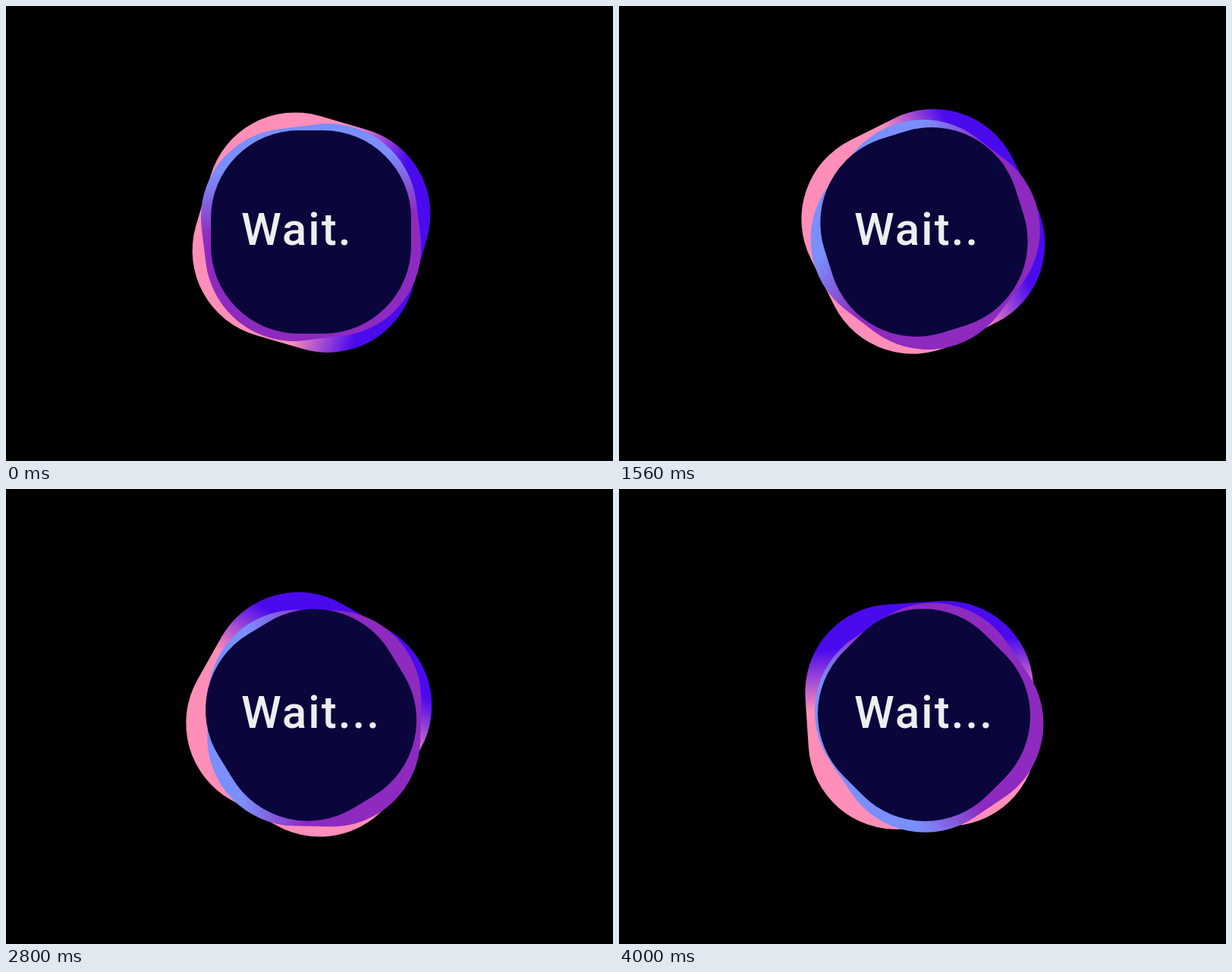
An HTML page with a canvas for the animation above (4040 ms loop, 800 by 600 pixels).

```html
<!DOCTYPE html>
<html lang="en">
<head>
<meta charset="utf-8">
<title>Wait</title>
<style>
  html, body { margin: 0; width: 100%; height: 100%; overflow: hidden; background: #000; }
  canvas { position: absolute; left: 0; top: 0; }
  #label {
    position: absolute; left: 310px; top: 260px;
    font: 500 60px/70px Roboto, sans-serif; letter-spacing: 2px;
    color: #eeeef0; white-space: pre;
  }
</style>
</head>
<body>
<canvas id="stage" width="800" height="600"></canvas>
<div id="label">Wait.</div>
<script>
const ctx = document.getElementById('stage').getContext('2d');
const label = document.getElementById('label');
const LOOP = 4040, STEP = 40;
const CENTER = { x: 402, y: 298 };

function gradient(x0, y0, x1, y1, from, to) {
  const g = ctx.createLinearGradient(x0, y0, x1, y1);
  g.addColorStop(0, from);
  g.addColorStop(1, to);
  return g;
}

// Angles in degrees, speed in degrees per second; each blob turns about its own pivot.
const blobs = [
  { w: 297, h: 301, r: 116, pivot: { x: 400, y: 300 }, start: 16.3, speed: -27.5,
    fill: gradient(14, 0, 94, 0, '#ff8eb8', '#4a0aee') },
  { w: 285, h: 281, r: 117, pivot: { x: 406.3, y: 298 }, start: -7, speed: -29.25,
    fill: gradient(0, -92, 0, -10, '#7a8ffb', '#8e2abf') },
  { w: 264, h: 268, r: 116, pivot: CENTER, start: 0, speed: -11.25,
    fill: '#0a063c' }
];

function drawBlob(b, sec) {
  ctx.save();
  ctx.translate(b.pivot.x, b.pivot.y);
  ctx.rotate((b.start + b.speed * sec) * Math.PI / 180);
  ctx.translate(CENTER.x - b.pivot.x, CENTER.y - b.pivot.y);
  ctx.beginPath();
  ctx.roundRect(-b.w / 2, -b.h / 2, b.w, b.h, b.r);
  ctx.fillStyle = b.fill;
  ctx.fill();
  ctx.restore();
}

function draw(ms) {
  const t = Math.floor((ms % LOOP) / STEP) * STEP;
  ctx.fillStyle = '#000';
  ctx.fillRect(0, 0, 800, 600);
  blobs.forEach(b => drawBlob(b, t / 1000));
  label.textContent = 'Wait' + '.'.repeat(1 + Math.floor(t * 3 / LOOP));
}

const begin = performance.now();
function tick() {
  draw(performance.now() - begin);
  requestAnimationFrame(tick);
}
draw(0);
requestAnimationFrame(tick);
</script>
</body>
</html>
```
